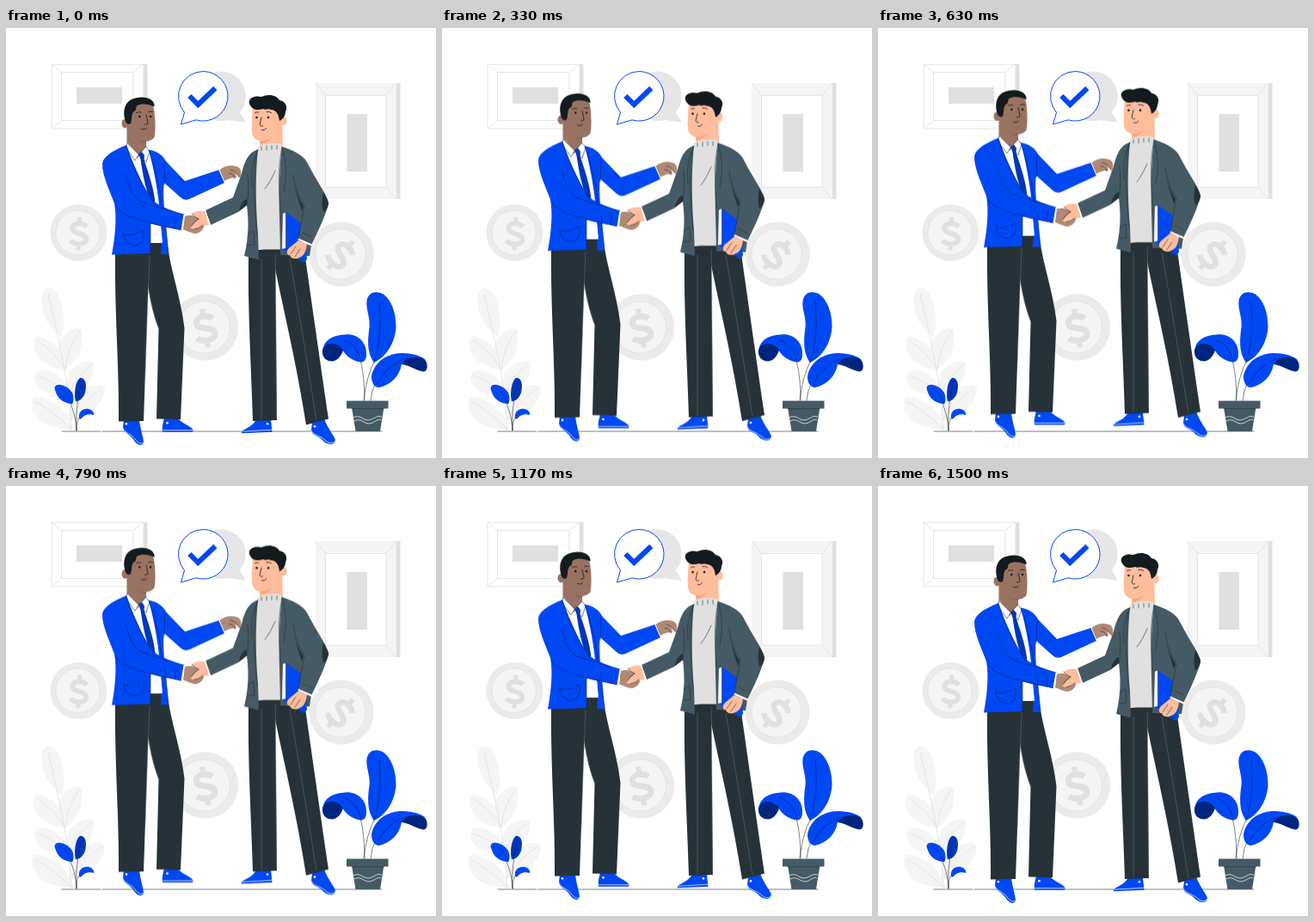
Animation, 500 px wide and 500 px high, one loop 1540 ms. Source, as an HTML page:

```html
<!DOCTYPE html>
<html lang="en">
<head>
<meta charset="utf-8">
<title>Handshake</title>
<style>
  html, body { margin: 0; width: 100%; height: 100%; overflow: hidden; background: #fff; }
  svg { display: block; width: 100vw; height: 100vh; }
  .blue { fill: #0048f3; }
  .navy { fill: #0036b8; }
  .deep { fill: #00257f; }
  .ink { fill: #263238; }
  .slate { fill: #455a64; }
  .hair { fill: #141b1f; }
  .brown { fill: #997261; }
  .brown2 { fill: #85604f; }
  .tan { fill: #b08975; }
  .peach { fill: #ffbd9c; }
  .peach2 { fill: #f5a380; }
  .pale { fill: #f5f5f5; }
  .grey { fill: #e0e0e0; }
  .white { fill: #fff; }
  .line { fill: none; stroke: #263238; stroke-width: .6; stroke-linecap: round; stroke-linejoin: round; }
  .seam { fill: none; stroke: #002078; stroke-width: .6; stroke-linecap: round; }
  .soft { fill: none; stroke: #e0e0e0; stroke-width: .8; }
  .crease { fill: none; stroke: #66757d; stroke-width: .5; }
  .face { fill: none; stroke: #141b1f; stroke-width: .8; stroke-linecap: round; }
  .float { animation: float 1540ms linear infinite; }
  @keyframes float {
    0%, 96%, 100% { transform: translateY(0); }
    47% { transform: translateY(-9.6px); }
  }
</style>
</head>
<body>
<svg viewBox="0 0 500 500">
  <defs>
    <g id="dollar" fill="none" stroke="#e0e0e0" stroke-width="6.4">
      <path d="M9.5 -9C5 -14 -8.5 -14.5 -8.5 -6.5C-8.5 2 9.5 -2 9.5 7C9.5 14.5 -5.5 15 -10.5 9.5"/>
      <path stroke-width="5.4" d="M0 -21V-12M0 12V21"/>
    </g>
    <g id="coin">
      <circle r="38" fill="#ebebeb"/>
      <circle cx="-1" r="29.5" fill="#f5f5f5" stroke="#e0e0e0" stroke-width=".8"/>
    </g>
  </defs>

  <!-- wall frames -->
  <path class="grey" d="M160 42H164.500V117H160Z"/>
  <path class="soft" d="M53 42.300H160V117H53ZM64.500 51.500H148V107.500H64.500ZM53 42.300L64.500 51.500M160 42.300L148 51.500M53 117L64.500 107.500M160 117L148 107.500"/>
  <path class="grey" d="M82 69H135V88H82Z"/>
  <path class="grey" d="M453.500 64H458.500V199H453.500Z"/>
  <path class="pale" d="M360 64H453.500V199H360Z"/>
  <path class="white" d="M371.500 78.500H442V185H371.500Z"/>
  <path class="soft" d="M371.500 78.500H442V185H371.500ZM360 64L371.500 78.500M453.500 64L442 78.500M360 199L371.500 185M453.500 199L442 185"/>
  <path class="grey" d="M396.500 100H420V167H396.500Z"/>

  <!-- coins -->
  <use href="#coin" transform="translate(84.500 238) scale(.87)"/>
  <use href="#dollar" transform="translate(85 239) rotate(3) scale(.92)"/>
  <use href="#coin" transform="translate(231.500 348) scale(1.02)"/>
  <use href="#dollar" transform="translate(231.500 349) rotate(-9) scale(1.08)"/>
  <use href="#coin" transform="translate(390 263) scale(.99)"/>
  <use href="#dollar" transform="translate(389 264) rotate(43) scale(1.03)"/>

  <!-- speech bubbles -->
  <path d="M250 50.500A28.800 28.800 0 0 1 271.800 98L278.800 110L258.300 106.900A28.800 28.800 0 1 1 250 50.500Z" fill="#e6e6e6"/>
  <path d="M229.300 50.500A28.800 28.800 0 1 1 221 106.900L203.500 112L207.500 98.100A28.800 28.800 0 0 1 229.300 50.500Z" fill="#fff" stroke="#0048f3"/>
  <path d="M213.300 79L223.300 89L243.300 70" fill="none" stroke="#0048f3" stroke-width="6"/>

  <!-- pale plant -->
  <g class="pale" stroke="#f5f5f5" stroke-width="2">
    <path d="M48 304C41 306 41 320 45 332C49 346 58 352 64 358C67 346 67 330 62 316C58 306 52 302 48 304Z"/>
    <path d="M86 351C78 348 66 357 62 370C60 382 64 388 69 396C80 388 88 375 87 360Q88 351 86 351Z"/>
    <path d="M34 361C31 372 36 385 50 391C58 395 66 396 69 397C68 386 62 372 52 366C44 361 36 357 34 361Z"/>
    <path d="M101 390C92 386 80 392 74 402C70 410 70 418 73 424C86 420 101 412 101 396Z"/>
    <path d="M35 402C32 412 40 421 52 424C62 426 70 427 74 428C72 415 62 404 50 400C42 398 36 398 35 402Z"/>
    <path d="M114 418C106 413 92 418 82 428C76 436 74 446 75 456C92 452 113 440 114 418Z"/>
    <path d="M32 432C29 444 38 458 52 462C62 465 72 466 76 467C74 452 64 440 50 434C40 430 33 428 32 432Z"/>
  </g>
  <path class="soft" d="M49 309C58 350 72 400 76 468M86 352Q72 370 69 396M36 363Q58 378 69 397M100 391Q82 405 73 424M36 404Q58 412 74 428M113 418Q88 434 75 456M33 434Q56 446 76 467"/>

  <path class="line" d="M65 469H110M112 469H437"/>

  <!-- small plant -->
  <path class="line" d="M82 468C81 455 80 445 68 422M82 468C81 452 82 440 87 415M82 468Q82 455 86 452"/>
  <path class="blue" d="M57 417C60 412 72 416 77 424C79 429 79 434 77 437C70 437 62 433 59 426C57 421 56 419 57 417Z"/>
  <path class="navy" d="M88 407C93 408 94 416 92 424C90 430 86 434 81 434C79 427 80 415 84 409Q86 406 88 407Z"/>
  <path class="blue" d="M85 453C84 446 90 442 96 443C101 444 103 448 102 450C97 448 90 450 88 454Q85 456 85 453Z"/>
  <path class="seam" d="M64 419Q73 427 77 437M88 411Q86 422 82 434"/>

  <!-- potted plant -->
  <path class="line" d="M417 433Q417 405 412 386M416 433Q419 405 429 386M424 433Q425 422 429 414"/>
  <path class="blue" d="M419.500 317C421 309 427 306 433 307.500C445 309 454 328 453.500 348C452 368 441 383 428 389C421 380 420 367 422 352C425 338 418 328 419.500 317Z"/>
  <path class="blue" d="M368 375C370 363 379 357 394 356.500C409 355 420 366 419 380C419 386 416 389 412 388.500C402 387 395 381 391 374Z"/>
  <path class="deep" d="M368 375C367 383 373 388 380 387.500C387 386 391 379 392 374C385 365 371 364 368 375Z"/>
  <path class="blue" d="M425 405C428 390 440 379 460 378C474 378 484 382 488 386L460 391C458 404 448 415 434 418C427 418 425 411 425 405Z"/>
  <path class="deep" d="M460 391C464 382 480 380 488 387C491 392 490 399 486 399.500C477 399 470 392 460 391Z"/>
  <path class="seam" d="M434 319C437 345 434 370 428 389M392 362Q409 368 413 387M432 413Q440 396 462 385"/>
  <path class="slate" d="M402 441H439.500L435 469H406.500Z"/>
  <path class="slate" d="M396 433.500H444.500V442.500H396Z"/>
  <path class="line" d="M402 442.700H439"/>
  <path fill="none" stroke="#fff" stroke-width=".7" d="M404 453Q409 450 415 454T427 454T437 452M405 457Q410 454 416 458T428 458T436 456"/>

  <g class="float">
    <!-- shoes -->
    <g transform="translate(0 1.200)">
      <path class="blue" d="M137 454H155C156 465 160 475 160 481C158 486 152 484 148 477C144 471 136 469 136 463Z"/>
      <path class="blue" d="M184 452H200C204 459 215 461 217.500 466L217 468.500H182C181 462 183 457 184 452Z"/>
      <path class="blue" d="M291 454H308L309.500 468.500L274 470C273 465 286 464 291 454Z"/>
      <path class="blue" d="M356 458L370 453C374 465 382 473 383 478C382 484 376 484 370 480C365 473 355 473 355 466Z"/>
      <path fill="none" stroke="#fff" stroke-width=".7" d="M136 464C138 470 147 471 151 478Q156 484 160 481M182 466.500H217M275 468L309 466M355 467C358 473 367 473 372 479Q379 484 383 479"/>
      <g class="white">
        <circle cx="140" cy="459" r="1.300"/><circle cx="187.500" cy="458" r="1.300"/>
        <circle cx="304" cy="459" r="1.300"/><circle cx="359" cy="462" r="1.300"/>
      </g>
    </g>

    <!-- trousers -->
    <path class="ink" d="M165 248H187C192 285 203 312 207.500 349L203 455L175 454.500L177.500 350C170 330 166 310 164 290Z"/>
    <path class="ink" d="M127 258H167L165 310L160 457L131 457.500C132 400 126 330 127 258Z"/>
    <path class="crease" d="M167 264Q164 330 162 400M166 303Q170 330 178 350"/>
    <path class="ink" d="M282 260L313 255L315 456L287 457C285 390 281 330 282 260Z"/>
    <path class="ink" d="M312 255L347 260C357 330 367 400 375 454.500L349 461.500C338 390 321 320 313 280Z"/>
    <path class="crease" d="M313.300 262L314.500 455M297 268L297 455M330 268Q344 350 361 456"/>

    <!-- left man: shirt, head, tie -->
    <path class="white" d="M140 137L164 139L178 160L182 250H168L150 180Z"/>
    <path class="brown" d="M140.500 106V134L153 151L163 139V128L170 100Z"/>
    <path class="brown" d="M148 88C158 83 171 86 172 94C174 106 174 121 172.500 127C168 133 156 134 151 129L142 118Z"/>
    <path class="brown2" d="M152 129C155 132 160 132.500 164 131.500L162.500 133.500Q156 133 152 129Z"/>
    <ellipse class="brown" cx="138.500" cy="111" rx="4" ry="5.200"/>
    <path class="hair" d="M139 109C135 97 138 87 146 83C153 79.500 163 79.500 168 83C172 86 173 89 172.500 91.500C165 87.500 156 88 153 90C150 92 152 95 150 96.500C145 98 147 106 145 111Q141 113 139 109Z"/>
    <path class="face" stroke-width="1.300" d="M151.500 98.500Q154 97 157 98M165.500 97.500Q168 96.500 170.500 97.500"/>
    <path class="face" d="M163 101L165.200 111Q164 112.500 161.500 112M157.500 117.500Q161 119.500 163.500 116.500"/>
    <circle class="hair" cx="155.300" cy="103" r="1.300"/><circle class="hair" cx="168" cy="103" r="1.300"/>
    <path class="white" d="M141 133L139 139L150 154L154 147ZM162.500 138L155 147L163 156L167 143Z"/>
    <path class="line" d="M141 134L139 139L150 154L154.500 147L141 134M162.500 138L155 147L163 156L167 143L162.500 138"/>
    <path class="navy" d="M154 146L158 144L161 148L160.500 153C166 170 172 186 173.500 204L167.500 200C162 186 159 170 156.500 153Z"/>

    <!-- left man: far arm and jacket -->
    <path class="blue" d="M166 141.500C175 143 183 148 186 155L208 178L247.500 165L254 180L213 199Q207 201 203 197L184 180C182 190 184 208 185 222L189 263H180L181 245L179 215C177 190 171 160 166 141.500Z"/>
    <path class="blue" d="M140 136C126 142 112 149 112 159C112 172 121 190 126 204C129 220 127 242 123 263.500L168 262V225L207 217L204 235L163 226L172 205C163 190 150 165 140 136Z"/>
    <path class="white" d="M168 224L180 230L182 249.500H168Z"/>
    <path class="blue" d="M155 185C166 200 180 209 207 217L204 235C187 232 168 228 150 222Z"/>
    <path class="seam" d="M166 142C172 160 181 190 181 210M140 137C148 165 160 185 172 204M185 156C183 165 186 172 184 182M207 178L200 174M139 170C143 185 148 197 157 202C172 207 190 212 207 217M128 208C140 222 160 225 204 235M137 239C141 243 150 240 160 235C162 244 158 253 149 253C142 252 137 246 137 239M185 222L189 263M168 226V262M198 222L196 232"/>
    <path class="white" d="M206.500 217L209 218L206 235.500L203.500 235ZM247.500 165L249.500 164.500L256 179L254 180Z"/>

    <!-- right man: head -->
    <path class="peach" d="M295 125V140L322 139L321 100Z"/>
    <path class="peach" d="M287 91C286 105 285 117 286.500 124C289 132 299 133 307 130L318 120L321 98L308 92Z"/>
    <path class="peach2" d="M295 131Q303 132 309 127Q305 133 296 135Z"/>
    <ellipse class="peach" cx="322.500" cy="108" rx="4" ry="5.200"/>
    <path class="hair" d="M283 88C281 81 290 78 297 80C305 76 315 78 318 84C325 85 328 92 325 97C325 102 322 106 318 108C317 100 314 95 308 95C305 93 302 96 299 94C293 96 286 96 283 88Z"/>
    <path class="face" stroke-width="1.300" d="M289.500 98.500Q291 97.500 293.500 98M303 97.500Q305.500 96.500 308.500 98.500"/>
    <path class="face" d="M297 104L295 112.500Q296 114.500 298.500 114M297.500 118.500Q301 119.500 302.500 116.500"/>
    <circle class="hair" cx="291.500" cy="104" r="1.300"/><circle class="hair" cx="305" cy="104" r="1.300"/>

    <!-- right man: jumper, book, jacket -->
    <path class="grey" d="M294 137C302 134 314 133 321 135.500L324 150L320 257.500L291 257.500L288 150Z"/>
    <path class="line" d="M297 138V142M303 137V142M309 136.500V141M315 136.500V141M313 166Q307 180 301 187"/>
    <path class="slate" d="M293 141C282 145 278 153 274 169L264 197L232 212L238 229L270 214L280 206C282 222 283 240 277 265L294 269.500L293 240C290 205 290 170 293 141Z"/>
    <path class="slate" d="M321 138C333 142 345 147 350 156C360 176 372 192 375 203C373 214 364 234 355 252L353 265L319 264C319 230 315 185 321 138Z"/>
    <path class="ink" d="M280 199C276 200 272 206 271 213L280 206ZM334 180Q338 195 346 207L344 213Q339 198 334 180Z"/>
    <path class="blue" d="M325.500 214L347 230L350 269L346.500 273L321 257Z"/>
    <path class="pale" d="M321.500 215.500L325.500 214L325.500 256L320.500 257Z"/>
    <path class="line" d="M321.500 215.500L325.500 214V256L346 271M321.500 215.500L320.500 257"/>
    <path class="peach" d="M340 247L329 256C325 260 327 265 330 264C331 269 338 269 341 267C347 265 349 259 350 251Z"/>
    <path class="line" d="M337 254L331 263M342 257L336 266"/>
    <path class="slate" d="M346 156C360 176 372 192 375 203C373 214 364 234 355 252L340 245L347 206L336 178Z"/>
    <path class="ink" d="M369 191Q375 200 375 205Q373 213 369 214Q366 203 369 191Z"/>
    <path class="white" d="M340 244.500L356 251.500L355 253.500L339.500 246.500ZM232 212L230 213L236 230L238 229Z"/>
    <path class="line" d="M321 138C315 170 318 190 319 214M321 140Q329 160 323 190M334 170Q336 190 347 206L340 244M292 143C286 170 289 205 292 240M281 170Q283 190 280 206M293 142Q283 160 286 185M281 240L288 236L289 252L281 253M345 238L355 243"/>

    <!-- hands -->
    <path class="tan" d="M248.500 165C254 160 262 159 268 161C273 162 274 167 273 173Q271 176 270 172L266 168C269 172 268 177 264 174C260 175 256 176 254 178Z"/>
    <path class="line" d="M261 165Q266 165 270 172M259 169Q264 169 266 174"/>
    <path class="tan" d="M208 219C214 217 222 218 229 225C232 230 229 236 224 238C219 241 212 236 206 234.500Z"/>
    <path class="peach" d="M231 213C225 212 219 213 216 216C218 220 222 221 224 222C218 226 213 230 215 233C218 235 224 233 228 230L236 229Z"/>
    <path class="tan" d="M208 219C214 217 219 219 224 222L216 230Q211 233 207 232Z"/>
    <path class="line" d="M224 222Q218 225 215 231M219 234Q225 233 229 229M216 216Q219 220 224 222"/>
  </g>
</svg>
</body>
</html>
```
